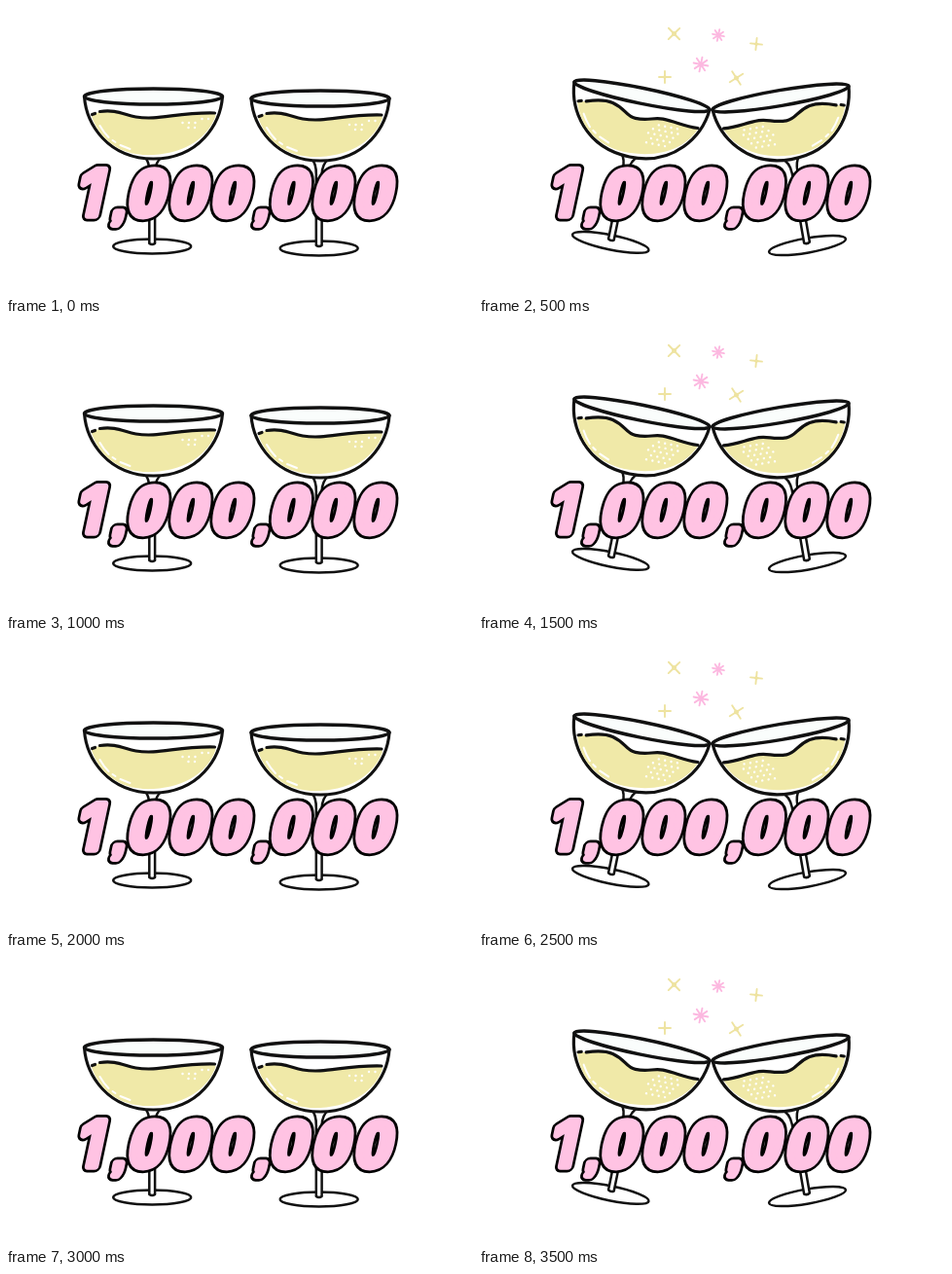
An HTML page that plays this animation: 480x297 px, repeating every 4 s.

```html
<!DOCTYPE html>
<html lang="en">
<head>
<meta charset="utf-8">
<title>Cheers</title>
<style>
html, body { margin: 0; height: 100%; overflow: hidden; background: #fff; }
svg { display: block; width: 480px; height: 297px; }
.ink { fill: #fff; stroke: #111; stroke-width: 3.2; stroke-linecap: round; stroke-linejoin: round; }
.thin { stroke-width: 2.5; }
.rim { fill: #fafdfc; stroke-width: 3.5; }
.wave { fill: none; }
.liquid { fill: #f0e9a8; }
.shine { fill: none; stroke: #fff; stroke-width: 2; stroke-linecap: round; }
.bubbles { fill: none; stroke: #fff; stroke-width: 2.4; stroke-linecap: round; stroke-dasharray: 0 6.5; }
.zero, .comma { font: bold 66px "Liberation Sans", Arial, sans-serif; }
.comma { font-size: 40px; }
.one { font: 500 64px Inter, sans-serif; }
text { text-anchor: middle; stroke-linejoin: round; }
.outline { fill: #000; stroke: #000; stroke-width: 13; }
.face { fill: #ffc3e3; stroke: #ffc3e3; stroke-width: 7.5; }
</style>
</head>
<body>
<svg viewBox="0 0 480 297">
  <defs>
    <!-- Origin is the centre of the rim. -->
    <g id="glass">
      <ellipse class="ink thin" cy="154" cx="-1.3" rx="40" ry="7.5"/>
      <path class="ink thin" d="M-9 62Q-4 67-4.2 78V151Q-1.3 153 1.6 151V78Q2 67 9 62Z"/>
      <path class="ink" d="M-71 0C-69 28-47 64 0 64S69 28 71 0Z"/>
      <ellipse class="ink rim" rx="71" ry="8"/>
    </g>
    <g id="still"></g>
    <g id="sloshing"></g>
  </defs>
  <g id="apart">
    <use href="#still" transform="translate(151.5 93)"/>
    <use href="#still" transform="translate(323 95)"/>
  </g>
  <g id="clink">
    <use href="#sloshing" transform="translate(167.5 92.3) rotate(11.6)"/>
    <use href="#sloshing" transform="translate(310 94.5) rotate(-9.8) scale(-1 1)"/>
    <g id="sparks" fill="none" stroke-linecap="round"></g>
  </g>
  <g id="number"></g>
</svg>
<script>
const byId = id => document.getElementById(id);
const yellow = "#eee3a0", pink = "#fcb8e0";

const filledGlass = (wave, bubbles) => `<use href="#glass"/>
  <path class="liquid" d="M-64 19L${wave}L64 20C56 42 34 58 0 60S-56 44-64 19Z"/>
  <path class="ink wave" d="M-63 18.5L-60 17.5M${wave}"/>
  <path class="shine" d="M-55 30Q-51 37-46 42M-42 45L-39 47M-34 50L-24 54"/>
  <path class="bubbles" d="${bubbles}"/>`;

byId("still").innerHTML = filledGlass(
  "-55 15.5C-38 13-30 19-18 21C6 25 24 16 63 17",
  "M30 27H44M36 32H44M50 23H58");
byId("sloshing").innerHTML = filledGlass(
  "-55 17C-47 14-38 11-28 13C-14 16-12 24-2 24C12 24 16 19 26 19C40 19 48 22 63 21",
  "M23 26H43M18 31H50M14 36H46M18 41H44M14 46H34");

// x, y, radius, rays, angle, colour
const sparks = [
  [200.5, 28.5, 8, 4, 0.8, yellow], [246, 30, 6, 8, 0.2, pink], [285, 39, 6, 4, 0.1, yellow],
  [228, 60, 7.5, 8, 0.2, pink], [264.5, 74, 8, 4, 1, yellow], [191, 73, 6, 4, 0, yellow]
];
byId("sparks").innerHTML = sparks.map(([x, y, r, rays, angle, colour]) => {
  let d = "";
  for (let i = 0; i < rays; i++) {
    const a = angle + i * 2 * Math.PI / rays;
    d += `M0 0L${r * Math.cos(a)} ${r * Math.sin(a)}`;
  }
  return `<g transform="translate(${x} ${y})" stroke="${colour}">
    <path d="${d}" stroke-width="1.9"/><circle r="${r / 4}" fill="${colour}"/></g>`;
}).join("");

const centres = [88.5, 115, 147, 190, 233, 262, 293.5, 337, 380];
const styles = { "1": ["one", 215], ",": ["comma", 217.5], "0": ["zero", 214.8] };
const layer = look => [..."1,000,000"].map((char, i) => {
  const [style, baseline] = styles[char];
  const middle = char === "," ? 217 : 192;
  return `<text class="${style} ${look}" y="${baseline - middle}"
    transform="translate(${centres[i]} ${middle}) skewX(-12)">${char}</text>`;
}).join("");
byId("number").innerHTML = layer("outline") + layer("face");

function draw(now) {
  const touching = Math.floor(now / 500) % 2 === 1;
  byId("apart").style.display = touching ? "none" : "";
  byId("clink").style.display = touching ? "" : "none";
  requestAnimationFrame(draw);
}
draw(0);
</script>
</body>
</html>
```
